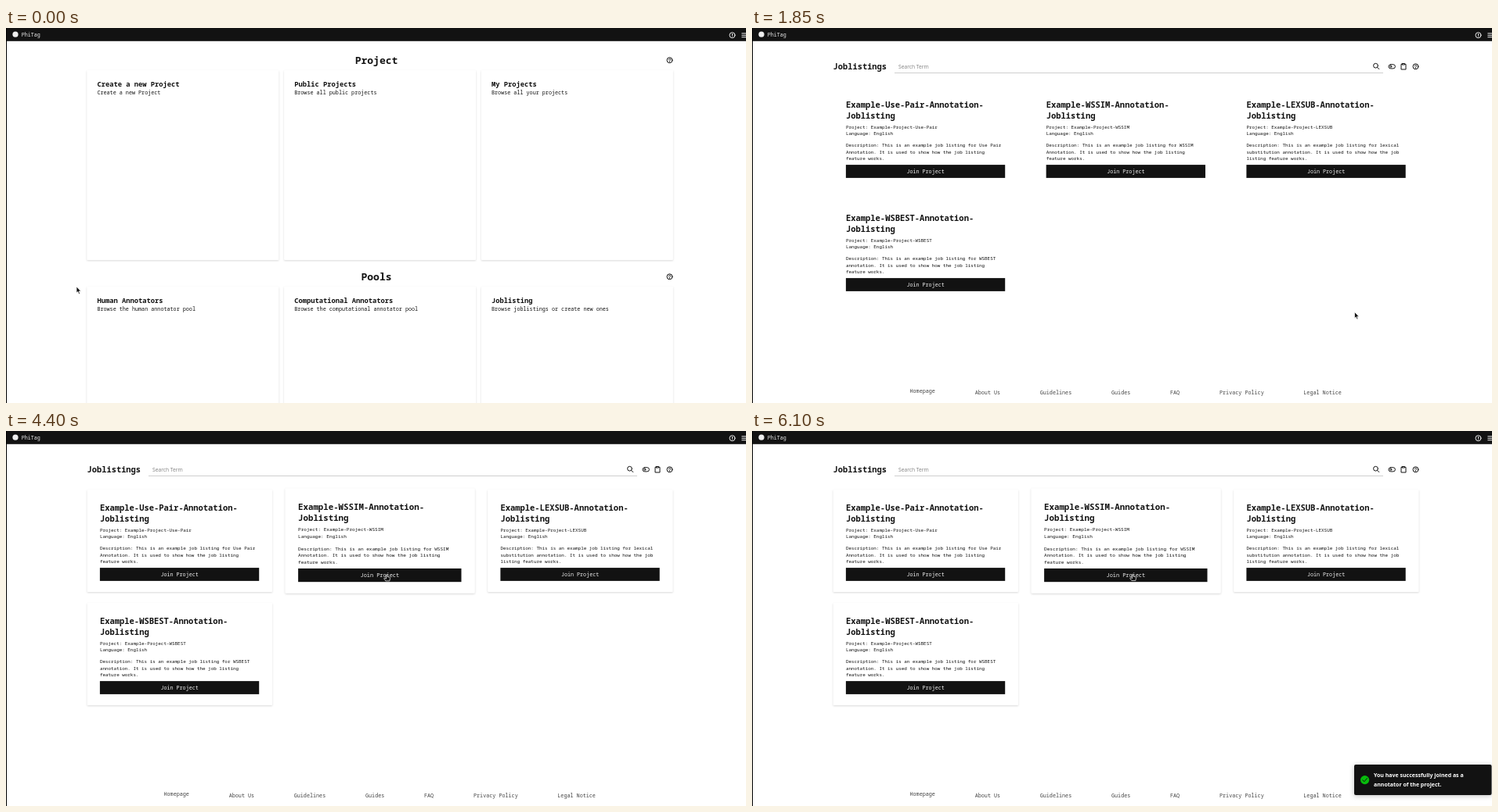
An HTML page that plays this animation: 945 by 480 pixels, repeating every 7450 ms.

```html
<!DOCTYPE html>
<html lang="en">
<head>
<meta charset="utf-8">
<title>Job listings</title>
<style>
  html, body { margin: 0; width: 100%; height: 100%; overflow: hidden; background: #fff; }
  svg { display: block; width: 945px; height: 480px; }
  text { font-family: "Noto Sans Mono", "DejaVu Sans Mono", monospace; fill: #121212; white-space: pre; }
  .sans { font-family: "Open Sans", "Noto Sans", sans-serif; }
  .card { fill: #fff; filter: drop-shadow(0 1.9px 1.2px rgba(0, 0, 0, .15)); }
  .icon { fill: none; stroke: #121212; stroke-width: 1; stroke-linecap: round; stroke-linejoin: round; }
  .light { stroke: #eee; }
</style>
</head>
<body>
<svg id="stage" viewBox="0 0 945 480"></svg>
<script>
const LOOP = 7450, STEP = 50, DARK = '#121212';
const stage = document.getElementById('stage');

function add(parent, tag, attrs, content) {
  const el = document.createElementNS('http://www.w3.org/2000/svg', tag);
  for (const k in attrs) el.setAttribute(k, attrs[k]);
  if (content) el.textContent = content;
  parent.appendChild(el);
  return el;
}
const group = parent => add(parent, 'g', {});
const rect = (p, x, y, width, height, fill, more) =>
  add(p, 'rect', { x, y, width, height, fill, ...more });
const icon = (p, d, more) => add(p, 'path', { d, class: 'icon', ...more });
const label = (p, x, y, size, str, more) =>
  add(p, 'text', { x, y, 'font-size': size, ...more }, str);

const BOLD = { 'font-weight': 600 };
const MID = { 'text-anchor': 'middle' };

function ring(p, x, y, d, cls = 'icon') {
  add(p, 'circle', { cx: x, cy: y, r: 3.5, class: cls });
  icon(p, d, { class: cls, transform: `translate(${x} ${y})`, 'stroke-width': .9 });
}
const help = (p, x, y) => ring(p, x, y, 'M-1.2-.8a1.2 1.2 0 1 1 1.9 1Q0 .5 0 .9M0 2v.1');

// Each card scales about its own centre
function card(parent, x, y, w, h) {
  const g = group(parent);
  const box = rect(g, x, y, w, h, '#fff', { rx: 1, class: 'card' });
  return { g, box, cx: x + w / 2, cy: y + h / 2 };
}

// Home page
const home = group(stage);
const homeCards = [];
const sections = [
  ['Project', 45.6, 54, [
    ['Create a new Project', 'Create a new Project'],
    ['Public Projects', 'Browse all public projects'],
    ['My Projects', 'Browse all your projects']]],
  ['Pools', 322.7, 331, [
    ['Human Annotators', 'Browse the human annotator pool'],
    ['Computational Annotators', 'Browse the computational annotator pool'],
    ['Joblisting', 'Browse joblistings or create new ones']]]
];
for (const [name, base, top, items] of sections) {
  label(home, 473, base, 13, name, { ...BOLD, ...MID });
  help(home, 847.5, base - 4.4);
  items.forEach(([title, sub], i) => {
    const x = 103.3 + i * 251.8;
    const c = card(home, x, top, 245, 243);
    label(c.g, x + 13.1, top + 20.5, 8.76, title, BOLD);
    label(c.g, x + 13.1, top + 30.8, 6.76, sub);
    homeCards.push(c);
  });
}

// Listing page
const list = group(stage);
label(list, 103.5, 52.5, 10.4, 'Joblistings', BOLD);
label(list, 187, 51.6, 6.7, 'Search Term', { class: 'sans', style: 'fill:#808080' });
rect(list, 182, 57, 624, .8, '#c4c4c4');
icon(list, 'M799.4 48.2a2.9 2.9 0 1 1-5.8 0a2.9 2.9 0 1 1 5.8 0M798.6 50.4l2.2 2.2');
icon(list, 'M815.6 46.7h3.2a2.6 2.6 0 0 1 0 5.2h-3.2a2.6 2.6 0 0 1 0-5.2zM816.9 49.3a1.1 1.1 0 1 1-2.2 0a1.1 1.1 0 1 1 2.2 0');
icon(list, 'M830.5 46.3h-1.5v6.7h6v-6.7h-1.5M830.5 45.5h3v1.5h-3z');
help(list, 847.5, 49.3);

const jobs = [
  ['Use-Pair', 'Description: This is an example job listing for Use Pair',
    'Annotation. It is used to show how the job listing', 'feature works.'],
  ['WSSIM', 'Description: This is an example job listing for WSSIM',
    'Annotation. It is used to show how the job listing', 'feature works.'],
  ['LEXSUB', 'Description: This is an example job listing for lexical',
    'substitution annotation. It is used to show how the job', 'listing feature works.'],
  ['WSBEST', 'Description: This is an example job listing for WSBEST',
    'annotation. It is used to show how the job listing', 'feature works.']
];
const listCards = jobs.map(([name, ...lines], i) => {
  const x = 103.6 + (i % 3) * 255.75, y = i < 3 ? 75 : 220;
  const c = card(list, x, y, 236.5, 131);
  const tx = x + 16.3;
  const small = (dy, s) => label(c.g, tx, y + dy, 5.91, s);
  label(c.g, tx, y + 27.1, 10.48, `Example-${name}-Annotation-`, BOLD);
  label(c.g, tx, y + 40.6, 10.48, 'Joblisting', BOLD);
  small(53.7, `Project: Example-Project-${name}`);
  small(62, 'Language: English');
  lines.forEach((s, n) => small(77.4 + n * 8.4, s));
  rect(c.g, tx, y + 100.1, 203.3, 16.8, DARK);
  label(c.g, tx + 101.7, y + 110.6, 6.72, 'Join Project', { ...MID, style: 'fill:#f2f2f2' });
  return c;
});
const links = [[201.5, 'Homepage'], [284.7, 'About Us'], [367.7, 'Guidelines'], [459, 'Guides'],
  [534, 'FAQ'], [597, 'Privacy Policy'], [704.3, 'Legal Notice']];
links.forEach(([x, s], i) =>
  label(list, x, i ? 469.2 : 467.2, 6.76, s, { style: 'fill:#444' }));

// Top bar and left edge
rect(stage, 0, 0, 945, 16.8, DARK);
rect(stage, 0, 0, 1, 480, '#000');
add(stage, 'circle', { cx: 12, cy: 8.2, r: 3.6, fill: '#eee' });
label(stage, 19.8, 11, 6.7, 'PhiTag', { style: 'fill:#eee' });
ring(stage, 927.5, 9.2, 'M0-1.7v1.9M0 1.7v.1', 'icon light');
icon(stage, 'M939.8 6.9h6M939.8 9.3h6M939.8 11.7h6', { class: 'icon light' });

// Toast at its resting place
const toast = group(stage);
rect(toast, 769, 427, 175.5, 39, DARK, {
  rx: 2, style: 'filter:drop-shadow(0 1px 3px rgba(0,0,0,.25))' });
add(toast, 'circle', { cx: 782.6, cy: 446.6, r: 5.6, fill: '#07bc0c' });
icon(toast, 'M779.8 446.8l2 2l3.6-4.2', { 'stroke-width': 1.2 });
['You have successfully joined as a', 'annotator of the project.'].forEach((s, i) =>
  label(toast, 794, 443 + i * 11.8, 7, s, { class: 'sans', 'font-weight': 700, style: 'fill:#fff' }));

// Pointers, tip at 0,0
const pointer = group(stage);
const ink = { fill: '#111', stroke: '#fff', 'stroke-width': .7, 'stroke-linejoin': 'round' };
const arrow = add(pointer, 'path', { d: 'M0 0V8L1.8 6.4L3.1 9.5L4.5 8.9L3.2 5.9H5.6Z', ...ink });
const hand = add(pointer, 'path', {
  d: 'M-.8 .6Q0-.5 .7 .6V3L3.6 3.7Q4.4 4 4.2 5L3.5 8.4H-1.5L-3.6 5.4Q-3.4 4.3-2.2 4.8L-.8 5.6Z', ...ink });

// time, x, y
const path = [
  [250, 90, 331], [350, 86, 334], [450, 112, 305], [560, 210, 265], [670, 352, 240],
  [760, 604, 265], [800, 693, 291], [860, 738, 325], [920, 762, 380], [980, 769, 376],
  [1050, 769.5, 363.5], [2550, 769.5, 363.5], [2650, 820, 347], [2800, 952, 316],
  [2950, 910, 292], [3050, 786, 182], [3250, 640, 183], [3450, 400, 185], [3650, 240, 184],
  [3800, 240, 184], [4000, 300, 190], [4200, 430, 187], [4400, 486.3, 183.5],
  [5200, 486.3, 183.5], [5201, 486.3, 183.1]
];
// card, enter, leave
const homeHover = [[0, 440, 660], [1, 600, 762], [2, 785, 865], [5, 880, 1650]];
const listHover = [[2, 3020, 3265], [1, 3285, 3490], [0, 3510, 4060], [1, 4080, LOOP]];
// time, shift
const slide = [[5200, 1650], [5650, -14], [5762, 5.5], [5875, -2.8], [5950, 0]];

const clamp = v => Math.max(0, Math.min(1, v));
const smooth = v => v * v * (3 - 2 * v);
const easeOut = v => 1 - (1 - v) ** 3;

function sample(table, t, ease = v => v) {
  let i = 0;
  while (i < table.length - 2 && t >= table[i + 1][0]) i++;
  const a = table[i], b = table[i + 1];
  const p = ease(clamp((t - a[0]) / (b[0] - a[0])));
  return a.slice(1).map((v, k) => v + (b[k + 1] - v) * p);
}

function hover(cards, spans, t) {
  cards.forEach((c, i) => {
    let k = 0;
    for (const [n, on, off] of spans) {
      if (n === i) k = Math.max(k, smooth(clamp((t - on) / 150)) - smooth(clamp((t - off) / 150)));
    }
    const s = 1 + .025 * k;
    c.g.setAttribute('transform',
      `translate(${c.cx} ${c.cy}) scale(${s}) translate(${-c.cx} ${-c.cy})`);
  });
}

const show = (el, on) => { el.style.display = on ? '' : 'none'; };
const inside = (spans, t) => spans.some(([, on, off]) => t >= on && t < off);

function draw(t) {
  const first = t < 1650;
  show(home, first);
  show(list, !first);
  if (first) hover(homeCards, homeHover, t);
  else {
    list.style.opacity = clamp((t - 1600) / 150);
    const depth = clamp((t - 1870) / 200);
    listCards.forEach(c => { c.box.style.opacity = depth; });
    hover(listCards, listHover, t);
  }
  const [x, y] = sample(path, t);
  pointer.setAttribute('transform', `translate(${x} ${y})`);
  const over = inside(first ? homeHover : listHover, t);
  show(hand, over);
  show(arrow, !over);

  show(toast, t >= 5200);
  toast.setAttribute('transform', `translate(${sample(slide, t, easeOut)[0]} 0)`);
}

const start = performance.now();
function tick() {
  const t = performance.now() - start;
  draw(Math.floor((t + 10) / STEP) * STEP % LOOP);
  requestAnimationFrame(tick);
}
tick();
</script>
</body>
</html>
```
